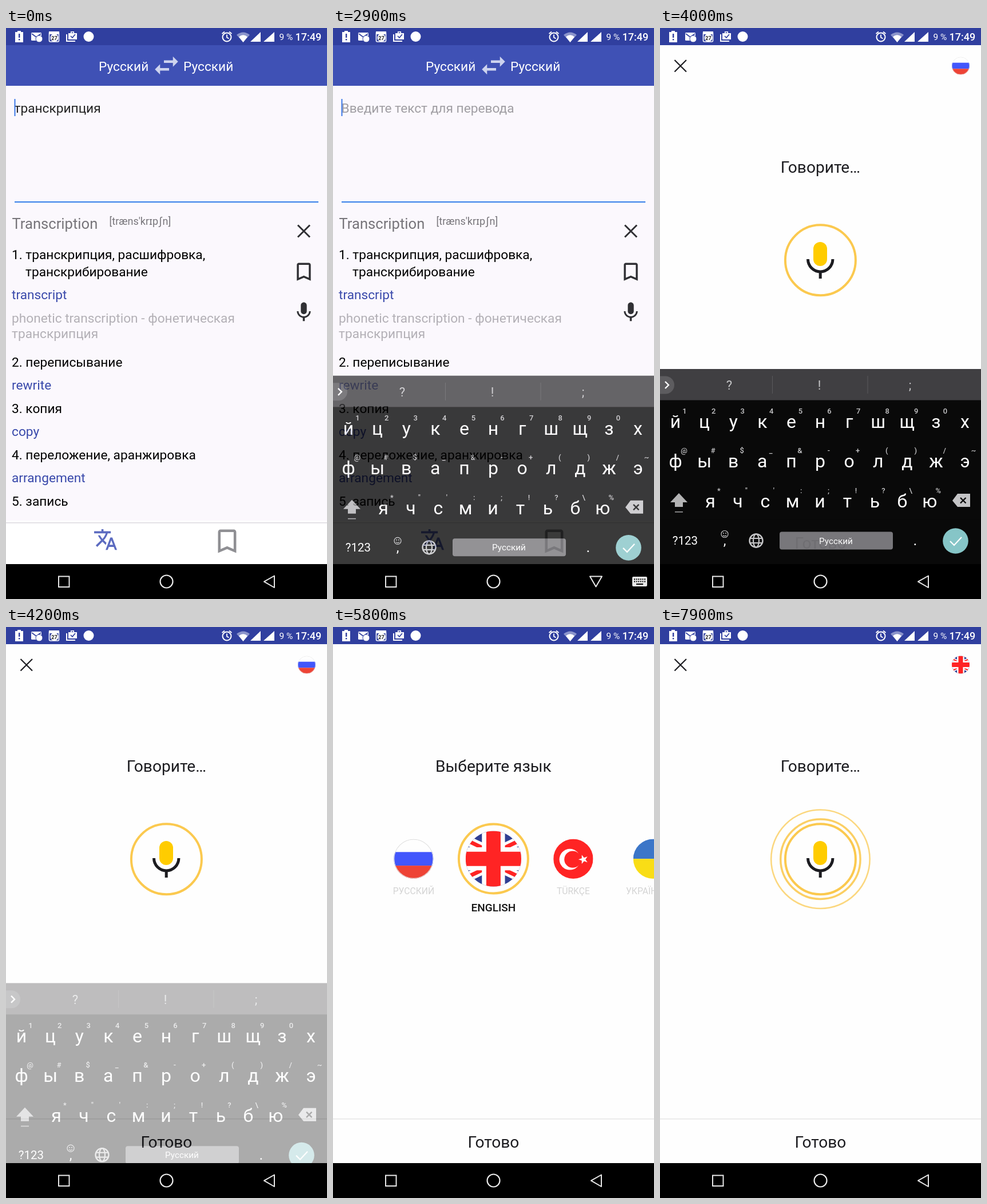
Write an HTML page that moves like this. It is 561 by 998 pixels and loops after 8 s.

```html
<!DOCTYPE html>
<html lang="ru">
<head>
<meta charset="utf-8">
<title>Переводчик</title>
<style>
  html, body { margin: 0; width: 100%; height: 100%; overflow: hidden; background: #000; }
  svg { display: block; width: 561px; height: 998px; font-family: Roboto, sans-serif; }
  text { white-space: pre; }
</style>
</head>
<body>
<svg id="stage" viewBox="0 0 561 998"></svg>
<script>
const LOOP = 8000, STEP = 100;
const CX = 280.4, CY = 405.8;
const INK = '#1c1c20', LINK = '#3949ab', GOLD = '#fbc94f';

// Markup helpers
const text = (x, y, size, str, fill = '#000', more = '') =>
  `<text x="${x}" y="${y}" font-size="${size}" fill="${fill}" ${more}>${str}</text>`;
const mid = (x, y, size, str, fill, more = '') =>
  text(x, y, size, str, fill, `text-anchor="middle" ${more}`);
const rect = (x, y, w, h, fill, more = '') =>
  `<rect x="${x}" y="${y}" width="${w}" height="${h}" fill="${fill}" ${more}/>`;
const circle = (x, y, r, fill, more = '') =>
  `<circle cx="${x}" cy="${y}" r="${r}" fill="${fill}" ${more}/>`;
const fill = (d, color) => `<path d="${d}" fill="${color}"/>`;
const line = (d, color, w, more = '') =>
  `<path d="${d}" fill="none" stroke="${color}" stroke-width="${w}" ${more}/>`;
const at = (x, y, k, body) => `<g transform="translate(${x} ${y}) scale(${k})">${body}</g>`;
const group = (id, body, more = '') => `<g id="${id}" ${more}>${body}</g>`;

const ICON = {
  mark: 'M17 3H7c-1.1 0-1.99.9-1.99 2L5 21l7-3 7 3V5c0-1.1-.9-2-2-2zm0 15l-5-2.18L7 18V5h10v13z',
  mic: 'M12 14c1.66 0 3-1.34 3-3V5c0-1.66-1.34-3-3-3S9 3.34 9 5v6c0 1.66 1.34 3 3 3zm5.3-3c0 3-2.54 5.1-5.3 5.1S6.7 14 6.7 11H5c0 3.41 2.72 6.23 6 6.72V21h2v-3.28c3.28-.48 6-3.3 6-6.72h-1.7z',
  swap: 'M7 11L3 15l4 4v-3H14v-2H7v-3zM21 9l-4-4v3H10v2h7v3L21 9z',
  translate: 'M12.87 15.07l-2.54-2.51.03-.03c1.74-1.94 2.98-4.17 3.71-6.53H17V4h-7V2H8v2H1v2h11.17C11.5 7.92 10.44 9.75 9 11.35 8.07 10.32 7.3 9.19 6.69 8h-2c.73 1.63 1.73 3.17 2.98 4.56l-5.09 5.02L4 19l5-5 3.11 3.11.76-2.04zM18.5 10h-2L12 22h2l1.12-3h4.75L21 22h2l-4.5-12zm-2.62 7l1.62-4.33L19.12 17h-3.24z'
};

// Flags, drawn in a circle of radius 35
const bands = (...list) => list.map(([y, h, c]) => rect(-35, y, 70, h, c)).join('');
const mirror = body => [[1, 1], [-1, 1], [1, -1], [-1, -1]]
  .map(([x, y]) => `<g transform="scale(${x} ${y})">${body}</g>`).join('');
const FLAG = {
  ru: bands([-35, 23, '#fefefe'], [-12, 24, '#4256fc'], [12, 23, '#ee4335']) +
    circle(0, 0, 34.4, 'none', 'stroke="#ddd" stroke-width="1.2"'),
  en: bands([-35, 70, '#303f92']) +
    mirror(line('M-36 -24.5L-10 -12', '#fff', 12) + line('M-36 -24.5L-10 -12', '#ff2424', 5)) +
    line('M-35 0H35M0 -35V35', '#fff', 29) + line('M-35 0H35M0 -35V35', '#ff2424', 18),
  tr: bands([-35, 70, '#ff2424']) + circle(-6, 1, 18.5, '#fff') + circle(-1, 1, 14.8, '#ff2424') +
    fill('M9 1l6-2 0-6 4 5 6-2-3.5 5 3.5 5-6-2-4 5 0-6z', '#fff'),
  ua: bands([-35, 35, '#3c76c8'], [0, 35, '#f9dd16'])
};
const flag = key => `<g clip-path="url(#disc)">${FLAG[key]}</g>`;
const LANGS = [['ru', 'РУССКИЙ'], ['en', 'ENGLISH'], ['tr', 'TÜRKÇE'], ['ua', 'УКРАЇНСЬКА']];

function statusBar() {
  const w = '#fff', bg = '#303f9f';
  return rect(0, 0, 561, 30, bg) +
    fill('M16 7h4V5h6v2h4v18H16z', w) + rect(22, 10, 2.4, 7, bg) + rect(22, 19, 2.4, 2.4, bg) +
    rect(44, 8, 18, 14, w, 'rx="1.5"') + line('M45 10l8 6 8-6', bg, 1.6) +
    circle(58, 19, 6, w, `stroke="${bg}" stroke-width="1"`) +
    rect(75.5, 7, 17, 17, 'none', 'rx="2" stroke="#fff" stroke-width="1.6"') + rect(75, 6, 18, 5, w) +
    circle(84.5, 17, 7, w) + mid(84.5, 20.5, 9, '27', '#222', 'font-weight="700"') +
    line('M106 11v12h15', w, 2) + fill('M109 9h4V6h6v3h5v11h-15zM114.5 7.5v1.5h3v-1.5z', w) +
    line('M113 14l3 3 5-6', bg, 1.7) +
    circle(144.5, 15, 9, w) +
    circle(386, 16, 7.5, 'none', 'stroke="#fff" stroke-width="2"') +
    line('M386 11.5v5l3.5 2M377.5 10l4.5-3.5M394.5 10l-4.5-3.5', w, 1.8) +
    fill('M403 12Q414.5 3 426 12L414.5 25z', '#8b94cb') + fill('M407 15.5Q414.5 9 422 15.5L414.5 25z', w) +
    fill('M445 7v17h-18zM469 7v17h-19z', w) +
    text(477.5, 21, 15.5, '9 %', w) + text(505.5, 22, 18, '17:49', w, 'font-weight="500"');
}

function navBar() {
  const c = '#e8e8e8';
  return rect(0, 937, 561, 61, '#000') +
    rect(92, 958.5, 18.5, 18.5, 'none', `stroke="${c}" stroke-width="2"`) +
    circle(280.5, 967.5, 11, 'none', `stroke="${c}" stroke-width="2.2"`) +
    group('back', line('M469 957.5V978L451 967.7z', c, 2, 'stroke-linejoin="round"')) +
    group('down', line('M449 958.5H470L459.5 976.5z', c, 2, 'stroke-linejoin="round"') +
      rect(523, 959, 26, 17, c, 'rx="2"') +
      line('M526 963.5h20M526 967.5h20', '#000', 2, 'stroke-dasharray="2 1.6"') + rect(530, 971, 12, 2, '#000'));
}

function translator() {
  const S = 22.7;
  const rows = [
    [404, '1. транскрипция, расшифровка,'], [474, 'transcript', LINK],
    [515, 'phonetic transcription - фонетическая', '#b3b0b6'], [542, 'транскрипция', '#b3b0b6'],
    [592, '2. переписывание'], [632, 'rewrite', LINK], [673, '3. копия'], [713, 'copy', LINK],
    [754, '4. переложение, аранжировка'], [794, 'arrangement', LINK], [835, '5. запись'],
    [877, 'recording', LINK]
  ];
  return rect(0, 30, 561, 907, '#fbf8fd') + rect(0, 30, 561, 71, '#3f51b5') +
    text(162, 75, S, 'Русский', '#fff') + text(310, 75, S, 'Русский', '#fff') +
    at(253.5, 38.5, 2.25, fill(ICON.swap, '#cdd3ee')) +
    text(14.5, 148, S, 'транскрипция', '#222', 'id="word"') +
    text(14.5, 148, S, 'Введите текст для перевода', '#a09ea3', 'id="hint"') +
    rect(14.5, 124, 2, 30, '#3b78e7', 'id="caret"') +
    rect(15, 303, 531, 2.2, '#3f85ea') +
    text(10.5, 351, 25.6, 'Transcription', '#77757a') +
    text(180.5, 344, 18, "[træns'krɪpʃn]", '#77757a') +
    rows.map(([y, s, c]) => text(10, y, S, s, c)).join('') + text(34, 434, S, 'транскрибирование') +
    line('M510 344.5L531 365.5M531 344.5L510 365.5', '#303034', 3) +
    at(499.6, 405.2, 1.74, fill(ICON.mark, '#303034')) + at(499.7, 476, 1.73, fill(ICON.mic, '#303034')) +
    rect(0, 861, 561, 76, '#fff') + rect(0, 864, 561, 1.5, '#dcdadf') +
    at(152.2, 872.3, 1.82, fill(ICON.translate, '#5c6bc0')) +
    at(359.1, 869.6, 2.28, fill(ICON.mark, '#8f8f93'));
}

function voiceScreen() {
  const S = 28.1;
  const ring = id => circle(CX, CY, 61.5, 'none', `id="${id}" stroke="${GOLD}" stroke-width="4"`);
  const voice = line('M25.5 56L46 76.5M46 56L25.5 76.5', INK, 2.2) +
    group('smallRu', at(525.5, 66, .443, flag('ru'))) + group('smallEn', at(525.5, 66, .443, flag('en'))) +
    mid(CX, 252.5, S, 'Говорите…', INK) + ring('wave2') + ring('wave1') + ring('ring') +
    rect(268, 374, 24, 42, '#ffcc00', 'rx="12"') +
    line('M258.5 404a21.7 22 0 0 0 43.4 0M280.2 425V438', INK, 5);
  const picker = mid(CX, 252.5, S, 'Выберите язык', INK) +
    circle(CX, 405, 60.5, 'none', `stroke="${GOLD}" stroke-width="4"`) +
    LANGS.map(([key, name], i) =>
      group('flag' + i, flag(key)) + mid(0, 0, 16, name, '#000', `id="name${i}"`)).join('');
  return rect(0, 30, 561, 1000, '#fefefe') + rect(0, 859, 561, 1.5, '#e6e6e6') +
    mid(CX, 910, S, 'Готово', INK) + group('voice', voice) + group('picker', picker);
}

function keyboard() {
  const w = '#fff', soft = '#c4c4c6';
  const rows = [
    ['йцукенгшщзх', '1234567890', 27, 50.6, 699, 16], ['фывапролджэ', '@#$_&-+()/~', 27, 50.6, 768, 15],
    ['ячсмитьбю', '*"\':;!?\\%', 88, 47.9, 838, 15]
  ];
  const keys = rows.map(([letters, marks, x0, gap, y, dx]) => [...letters].map((ch, i) => {
    const x = x0 + i * gap, mark = (marks[i] || '').replace('&', '&amp;');
    return mid(x, y, 32, ch, w) + mid(x + dx, y - 25, 13, mark, soft, 'font-weight="500"');
  }).join('')).join('');
  return rect(0, 596, 561, 402, '#000') + rect(0, 596, 561, 54.5, '#39383b') +
    rect(196, 608, 1, 31, '#545356') + rect(362.5, 608, 1, 31, '#545356') +
    rect(-20, 608.5, 45, 31, '#575659', 'rx="15.5"') + line('M9 618l6 6-6 6', w, 2.4) +
    mid(121, 632, 22, '?', soft) + mid(278.5, 632, 22, '!', soft) + mid(437, 632, 22, ';', soft) + keys +
    fill('M33 813L48 829H40V837H26V829H18z', '#b0b0b2') + rect(26, 845, 14, 1.6, '#99999b') +
    fill('M511 826L520 814H542V837H520z', '#c2c2c4') +
    line('M525 821l9.5 9.5M534.5 821l-9.5 9.5', '#000', 2.4) +
    mid(44, 903, 20.5, '?123', w) + mid(113, 904, 24, ',', w) +
    circle(113, 884.5, 6, 'none', `stroke="${soft}" stroke-width="1.2"`) +
    circle(111, 883, 1, soft) + circle(115, 883, 1, soft) + line('M110 886.5q3 3 6 0', soft, 1.2) +
    circle(168, 896, 11.5, 'none', `stroke="${soft}" stroke-width="2.4"`) +
    `<ellipse cx="168" cy="896" rx="5" ry="11.5" fill="none" stroke="${soft}" stroke-width="2.2"/>` +
    line('M158 892h20M158 900h20', soft, 2.2) +
    rect(209, 880.5, 198, 31, '#737276', 'rx="4"') + mid(307.5, 901.5, 15.3, 'Русский', w) +
    mid(446, 904, 26, '.', w) +
    circle(516.5, 896.5, 22.3, '#82c3c5') + line('M507 897l7 7 13-14', w, 2.2);
}

const stage = document.getElementById('stage');
stage.innerHTML = `<defs><clipPath id="disc"><circle r="35"/></clipPath></defs>` +
  group('app', translator()) + group('screen', voiceScreen()) + group('keys', keyboard()) +
  statusBar() + navBar();

const el = {};
stage.querySelectorAll('[id]').forEach(n => el[n.id] = n);
const set = (n, props) => { for (const k in props) n.setAttribute(k, props[k]); };
const show = (n, alpha) => set(n, { opacity: +alpha, display: +alpha > 0 ? 'inline' : 'none' });
const ramp = (t, a, b) => Math.min(1, Math.max(0, (t - a) / (b - a)));
const smooth = p => p * p * (3 - 2 * p);
const mix = (a, b, p) => a + (b - a) * p;

function drawPicker(pos) {
  LANGS.forEach((_, i) => {
    const off = i - pos, d = Math.min(1, Math.abs(off)), x = CX + 139.5 * off;
    const shade = Math.round(mix(20, 212, d));
    set(el['flag' + i], { transform: `translate(${x} 405.2) scale(${mix(48.6, 34.7, d) / 35})` });
    set(el['name' + i], {
      x, y: mix(497, 467, d), 'font-size': mix(19, 15.7, d),
      'font-weight': d < .5 ? 500 : 400, fill: `rgb(${shade},${shade},${shade})`
    });
  });
}

function draw(t) {
  const cleared = t >= 2500;
  show(el.word, !cleared);
  show(el.hint, cleared);
  show(el.caret, t < 3000 && t % 1000 < 500 || cleared && t < 3000);

  // The slightly see-through keyboard rises, later drops away
  const rest = 1 - ramp(t, 2700, 3300), out = ramp(t, 4000, 4300);
  show(el.keys, .96 * (1 - rest ** 4) * (1 - out));
  set(el.keys, { transform: `translate(0 ${60 * rest ** 4 + 60 * out * out})` });
  const typing = t >= 2800 && t < 4000;
  show(el.back, !typing);
  show(el.down, typing);

  const open = ramp(t, 3450, 3850);
  show(el.screen, open);
  set(el.screen, { transform: `translate(0 ${70 * (1 - open) ** 3})` });

  const done = t >= 6500;
  show(el.voice, done ? ramp(t, 6600, 7000) : 1 - ramp(t, 4350, 4650));
  show(el.picker, done ? 1 - ramp(t, 6400, 6750) : ramp(t, 4480, 4850));
  show(el.smallRu, !done);
  show(el.smallEn, done);
  drawPicker(smooth(ramp(t, 5300, 5800)));

  // Rings follow the loudness of the voice
  const loud = 1.68 * Math.sin(Math.PI * ramp(t, 7100, 8103));
  set(el.wave1, { r: 61.5 + 8.2 * loud, 'stroke-width': 3.5 });
  set(el.wave2, { r: 61.5 + 24.8 * loud, 'stroke-width': 2.6 });
  show(el.wave1, loud > .01 && .88);
  show(el.wave2, loud > .01 && .72);
}

const start = performance.now();
function tick() {
  const t = (performance.now() - start) % LOOP;
  draw(Math.floor(t / STEP) * STEP);
  requestAnimationFrame(tick);
}
draw(0);
requestAnimationFrame(tick);
</script>
</body>
</html>
```
